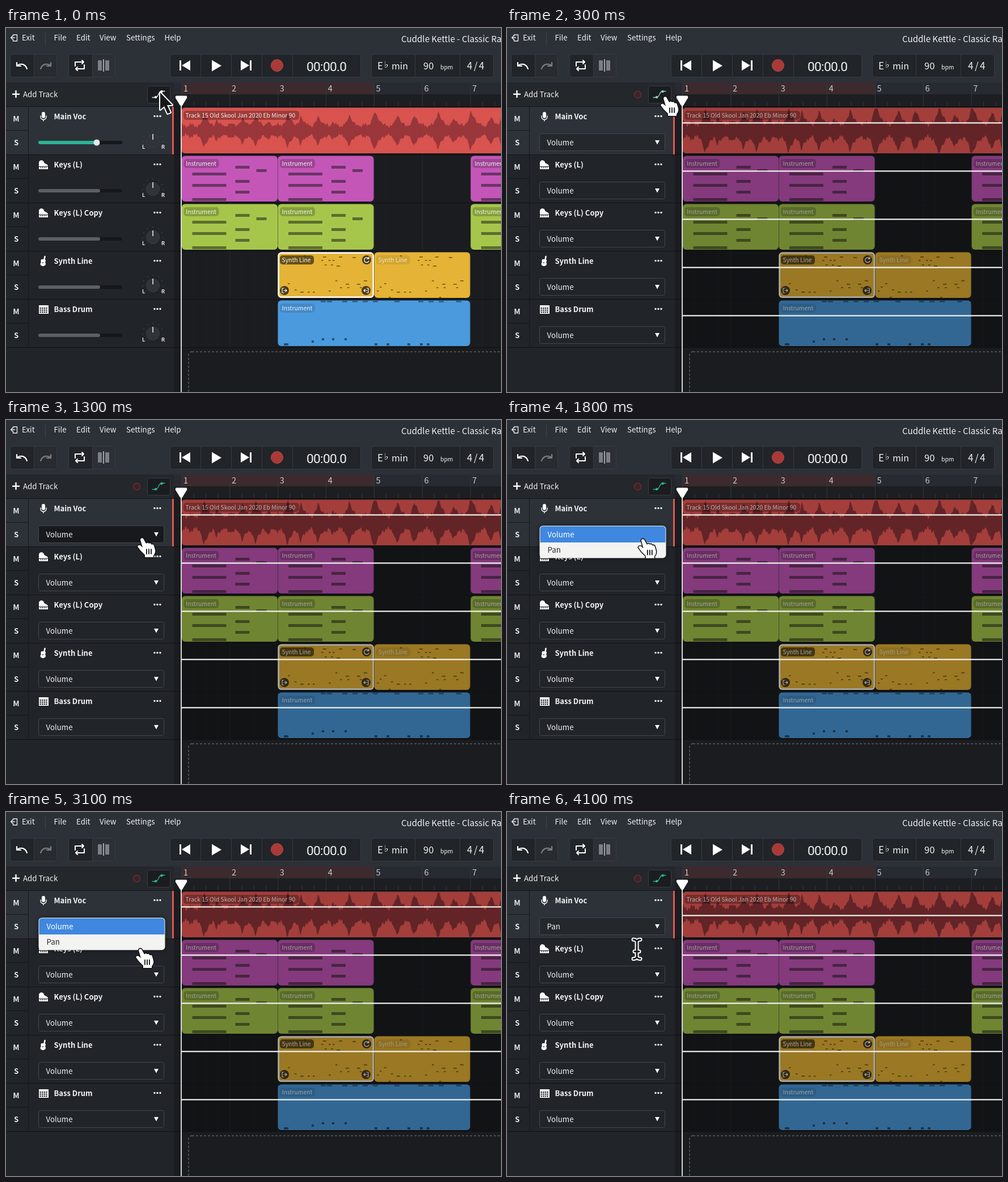
These frames come from a looping animation (873 px wide and 642 px high, 4700 ms). An HTML page with a canvas:

```html
<!DOCTYPE html>
<html lang="en">
<head>
<meta charset="utf-8">
<title>Track automation</title>
<style>
  html, body { margin: 0; width: 100%; height: 100%; overflow: hidden; background: #1a1c1f; }
  canvas { display: block; }
</style>
</head>
<body>
<canvas id="stage" width="873" height="642"></canvas>
<script>
const c = document.getElementById('stage').getContext('2d');
const SANS = '"Noto Sans CJK JP", "Noto Sans CJK SC", "Noto Sans", sans-serif';
const LOOP = 4700, STEP = 100, LAST = 4100;
const ROW = 85, TOP = 139;

// ---------- drawing helpers ----------
function rect(x, y, w, h, color) {
  c.fillStyle = color;
  c.fillRect(x, y, w, h);
}
function box(x, y, w, h, r, fill, stroke, lw = 1) {
  c.beginPath();
  c.roundRect(x, y, w, h, r);
  if (fill) { c.fillStyle = fill; c.fill(); }
  if (stroke) { c.strokeStyle = stroke; c.lineWidth = lw; c.stroke(); }
}
function dot(x, y, r, fill, stroke, lw = 1) {
  c.beginPath();
  c.arc(x, y, r, 0, 7);
  if (fill) { c.fillStyle = fill; c.fill(); }
  if (stroke) { c.strokeStyle = stroke; c.lineWidth = lw; c.stroke(); }
}
function shape(d, x, y, fill, stroke, lw = 1) {
  const p = new Path2D(d);
  c.save();
  c.translate(x, y);
  c.lineJoin = c.lineCap = 'round';
  if (stroke) { c.strokeStyle = stroke; c.lineWidth = lw; c.stroke(p); }
  if (fill) { c.fillStyle = fill; c.fill(p); }
  c.restore();
}
function text(s, x, y, size = 13.3, color = '#f1f2f3', weight = 400, family = SANS, spacing = 0) {
  c.font = `${weight} ${size}px ${family}`;
  c.letterSpacing = spacing + 'px';
  c.fillStyle = color;
  c.fillText(s, x, y);
}

// ---------- top bar ----------
function buttonGroup(x, w, splits) {
  box(x + .5, 46.5, w, 40, 4, '#212429', '#383c42');
  for (const s of splits) rect(s, 47, 1, 39, '#383c42');
}
function topBar() {
  rect(0, 0, 873, 96, '#2c3037');
  shape('M4 -3V-5H11V6H4V3M0 0H7M3 -3L0 0L3 3', 8.5, 17, null, '#e8e9ea', 1.4);
  rect(69, 8, 1, 23, '#3d4148');
  [['Exit', 28], ['File', 84.5], ['Edit', 124], ['View', 165], ['Settings', 212], ['Help', 279.5]]
    .forEach(([s, x]) => text(s, x, 22));
  text('Cuddle Kettle - Classic Rap', 697, 25, 15.1);

  buttonGroup(7, 82, [49]);
  buttonGroup(110, 82, [152]);
  buttonGroup(289, 336, [343, 397, 451, 505]);
  buttonGroup(644, 215, [721, 800]);
  rect(50, 47, 39, 39, '#282c31');
  rect(153, 47, 39, 39, '#2c3036');

  const undo = 'M-8 -1C-2 -5 6 -4 9 5M-9 -6V0H-2';
  shape(undo, 28, 67, null, '#fff', 2.2);
  c.save();
  c.scale(-1, 1);
  shape(undo, -70, 67, null, '#7c8085', 2.2);
  c.restore();
  shape('M-8 1V-6H7M4 -9L7 -6L4 -3M8 -1V6H-7M-4 3L-7 6L-4 9', 130, 66, null, '#fff', 2);
  rect(162, 57, 7, 18, '#7c8085');
  rect(175, 57, 7, 18, '#7c8085');
  rect(171, 55, 2, 22, '#a1a4a8');

  rect(306, 57, 3, 18, '#fff');
  shape('M0 0L15 -9V9Z', 310, 66, '#fff');
  shape('M0 -10L17 0L0 10Z', 363, 66.5, '#fff');
  shape('M0 -9L15 0L0 9Z', 414, 66, '#fff');
  rect(430, 57, 3, 18, '#fff');
  dot(478, 66, 10.5, '#a93a38', '#bd4743');

  text('00:00.0', 530, 76, 22.7, '#f1f2f3', 400, 'Roboto, sans-serif', -.7);
  text('E', 655, 73, 17);
  text('♭', 667, 70, 16, '#f1f2f3', 400, '"DejaVu Sans", sans-serif');
  text('min', 680, 73, 16);
  text('90', 736, 73, 16.5);
  text('bpm', 766, 73, 10.4);
  text('4/4', 813, 73, 17, '#f1f2f3', 400, SANS, 2.5);
}

// ---------- left panel ----------
const icons = [
  (x, y) => {
    box(x - 3, y - 8, 6, 11, 3, '#fff');
    shape('M-5 -1V1C-5 7 5 7 5 1V-1M0 6V8', x, y, null, '#fff', 1.4);
  },
  piano, piano,
  (x, y) => {
    shape('M2.5 -8L1 0', x, y, null, '#fff', 2.6);
    shape('M-1 -3C-5 -4 -5 0 -4 2C-7 5 -5 9 -1 9C4 9 5 5 3 2C5 -1 4 -3 1 -3Z', x, y, '#fff');
    dot(x - 1, y + 3, 1, '#333');
  },
  (x, y) => {
    rect(x - 8, y - 7, 17, 15, '#fff');
    for (let i = 0; i < 12; i++)
      rect(x - 6.5 + i % 4 * 3.6, y - 3 + (i >> 2) * 3.5, 2.4, 2.3, '#24272b');
  }
];
function piano(x, y) {
  shape('M-8 3V-3C-8 -9 0 -9 1 -4C2 -1 8 -2 8 3Z', x, y, '#fff');
  rect(x - 8, y + 4, 16, 4, '#fff');
  for (let i = -5; i < 7; i += 3) rect(x + i, y + 4, 1, 2.5, '#24272b');
}
function slider(y, active) {
  box(57, y - 3, 148, 6, 3, '#15171a');
  box(57, y - 3, active ? 103 : 109, 6, 3, active ? '#2bb596' : '#5d6063');
  if (active) dot(160, y, 5.5, '#e6e6e6');
}
function panKnob(y) {
  for (let i = 0; i <= 8; i++) {
    const a = (i - 4) * .55 - Math.PI / 2;
    rect(258.5 + 18 * Math.cos(a), y - .5 + 18 * Math.sin(a), 1.1, 1.1, '#65696e');
  }
  dot(259, y, 11.5, '#303439', '#3a3e43');
  rect(258.2, y - 12, 1.6, 10, '#e6e7e8');
  text('L', 240, y + 14, 9, '#e6e7e8', 600);
  text('R', 274, y + 14, 9, '#e6e7e8', 600);
}
function dropdown(y, label, fill) {
  box(57.5, y + 47.5, 221, 30, 3, fill, '#44484e');
  text(label, 70.5, y + 67.5);
  shape('M0 0H8L4 7.5Z', 261, y + 59, '#fff');
}
function leftPanel(state) {
  rect(0, 96, 296, 546, '#212429');
  rect(0, 96, 296, 42, '#24272c');
  rect(11, 115.5, 13, 2.4, '#fff');
  rect(16.3, 110, 2.4, 13, '#fff');
  text('Add Track', 30, 121.5);

  box(249.5, 102.5, 40, 30, 3, '#1a1c20', '#383c42');
  if (state.on) dot(230.5, 117.5, 6, '#3a2428', '#752c2f', 1.3);
  shape('M0 0H6C11 0 11 -11 16 -11H22', 258, 122.5, null, state.iconColor, 1.3);
  dot(264, 122, 2.2, state.iconColor);
  dot(274.5, 112, 2.2, state.iconColor);

  ['Main Voc', 'Keys (L)', 'Keys (L) Copy', 'Synth Line', 'Bass Drum'].forEach((name, i) => {
    const y = TOP + i * ROW, first = i === 0;
    if (first) rect(0, y, 296, 84, '#2d3238');
    rect(0, y - 1, 296, 1, '#121416');
    rect(0, y + 41, 40, 1, '#15171a');
    rect(39, y, 1, 84, '#15171a');
    text('M', 12.2, y + 25.5, 13.3, '#e6e7e8', 600);
    text('S', 14, y + 67.7, 13.3, '#e6e7e8', 600);
    icons[i](66, y + 17);
    text(name, 84.5, y + 21.5, 13, '#f4f5f5', 600);
    for (const x of [262, 267, 272]) dot(x, y + 16.5, 1.7, '#f1f2f3');
    if (state.on) {
      const fill = first ? (state.hover ? '#17191c' : '#24282d') : '#212429';
      dropdown(y, first && state.pan ? 'Pan' : 'Volume', fill);
    } else {
      slider(y + 63, first);
      panKnob(y + 60);
    }
  });
  rect(0, 563, 296, 1, '#121416');
  rect(293, TOP, 3, 84, '#e0574f');
}

// ---------- timeline ----------
function clip(x, y, w, color, draw) {
  c.save();
  box(x + .5, y - .5, w - 1, 80.5, 6, color);
  c.clip();
  draw(x, y);
  c.restore();
}
function label(s, x, y, w, shade = .2, alpha = .9) {
  box(x + 4, y + 5, w, 16, 5, `rgba(0,0,0,${shade})`);
  text(s, x + 7.5, y + 17, 10.4, `rgba(255,255,255,${alpha})`);
}

const peaks = [[350, 32], [372, 20], [398, 16], [417, 26], [440, 30], [462, 18], [497, 32], [520, 27],
  [550, 28], [577, 17], [605, 30], [650, 38], [690, 30], [720, 30], [762, 36], [790, 24], [820, 38], [855, 27], [876, 32]];
// Quick attack, slower decay around each peak, on a rippling floor.
function level(x) {
  const hit = Math.max(...peaks.map(([p, a]) => a * Math.exp(-Math.abs(x - p) / (x < p ? 8 : 13))));
  const floor = 10 + 3 * Math.sin(x * .37) + 2 * Math.sin(x * 1.3);
  return Math.max(floor, hit + 2 * Math.sin(x * .8));
}
function waveform(gain, color) {
  c.beginPath();
  c.moveTo(310, 181);
  for (let x = 310; x <= 874; x++) c.lineTo(x, 181 - Math.min(39, gain * level(x)));
  for (let x = 874; x >= 310; x--) c.lineTo(x, 181 + Math.min(39, gain * level(x + 1)));
  c.fillStyle = color;
  c.fill();
}

const chords = [[19, 29, 60], [19, 49, 60], [19, 74, 60], [95, 17, 25], [95, 42, 25], [95, 61, 25], [132, 23, 18]];
function keysClip(x, y, color) {
  clip(x, y, 170, color, () => {
    for (const [dx, dy, w] of chords) rect(x + dx, y + dy, w, 5, 'rgba(20,20,20,.5)');
    label('Instrument', x, y, 62);
  });
}

const synthNotes = [[77, 13], [83, 21], [90, 13], [97, 13], [94, 21], [108, 7], [80, 7], [104, 23], [132, 8], [46, 5],
  [10, 60], [18, 54], [30, 65], [40, 69], [53, 69], [62, 69], [90, 67], [102, 49], [110, 61], [120, 55], [123, 61],
  [140, 55], [145, 61], [152, 49], [5, 67], [26, 78], [115, 78]];
function synthClip(x, y, selected) {
  clip(x, y, 170, '#e5b335', () => {
    for (const [dx, dy] of synthNotes) rect(x + dx, y + dy, dx % 4 ? 3.5 : 6, 1.8, 'rgba(40,30,10,.55)');
    label('Synth Line', x, y, 60, selected ? .55 : .08, selected ? .95 : .7);
  });
  if (!selected) return;
  box(x + 1.7, y + .8, 167, 78, 5, null, '#fff', 2.5);
  for (const [dx, dy] of [[157, 13], [12, 67], [156, 67]]) dot(x + dx, y + dy, 8, '#4b3d1c');
  shape('M3 -3A4.3 4.3 0 1 0 4 2M4 -5V-2H1', x + 157, y + 13, null, '#fff', 1.3);
  shape('M-1 -4H-4V4H-1M-1 0H4M2 -2L4 0L2 2', x + 12, y + 67, null, '#fff', 1.2);
  shape('M1 -4H4V4H1M2 0H-4M-2 -2L-4 0L-2 2', x + 156, y + 67, null, '#fff', 1.2);
}
function drumClip(x, y) {
  clip(x, y, 340, '#4a9add', () => {
    const ink = 'rgba(15,30,45,.6)';
    for (const dx of [76, 87, 114, 132, 150, 168, 206, 248, 266, 284, 315]) rect(x + dx, y + .5, 9, 2, ink);
    for (const [dx, dy] of [[60, 70], [78, 66], [96, 66], [118, 66]]) rect(x + dx, y + dy, 4, 4, ink);
    for (const dx of [11, 171, 192, 229, 251, 263]) rect(x + dx, y + 75, dx < 20 ? 8 : 5, 4, ink);
    label('Instrument', x, y, 62, .1);
  });
}

function timeline(state) {
  rect(296, 96, 577, 546, '#1a1c1f');
  rect(296, 96, 577, 21, '#272b31');
  rect(310, 96, 339, 21, '#3c2a2e');
  rect(296, 117, 577, 22, '#1c1e22');
  for (let i = 0; i < 27; i++) {
    const x = 309.5 + i * 21.22, bar = i % 4 === 0;
    rect(x, bar ? 97 : 130, 1, bar ? 41 : 8, '#34383d');
    rect(x, TOP, 1, 424, bar ? '#26292d' : '#1f2225');
    if (bar) text(String(i / 4 + 1), x + 3.5, 112, 14.5, '#c9cbcd');
  }
  for (let i = 0; i <= 5; i++) rect(296, TOP - 1 + i * ROW, 577, 1, '#0f1012');

  clip(309, 141, 580, '#d9534f', () => {
    waveform(state.on ? 1.25 : .92, state.on ? '#843034' : '#96353a');
    if (!state.on) for (let x = 310; x < 873; x += 3) rect(x, 142, 1, 78, 'rgba(217,83,79,.16)');
    label('Track 15 Old Skool Jan 2020 Eb Minor 90', 309, 141, 204, .28);
  });
  [['#c456b8', 226], ['#a6c64b', 311]].forEach(([color, y]) => {
    for (const x of [309.5, 479, 819]) keysClip(x, y, color);
  });
  synthClip(479, 396, true);
  synthClip(649, 396, false);
  drumClip(479, 481);

  if (state.on) for (let i = 0; i < 5; i++) {
    const y = TOP + i * ROW;
    rect(310, y, 563, 84, `rgba(0,0,0,${i ? .33 : .25})`);
    rect(310, y + (i === 0 && state.pan ? 42.5 : 27.3), 563, 2.2, '#f4f4f0');
  }

  c.setLineDash([4, 3]);
  box(322, 571, 700, 200, 6, null, '#565a5f', 1.6);
  c.setLineDash([]);
  rect(308.2, 136, 1.7, 506, '#f4f4f4');
  shape('M-8 -9H8Q11 -9 10 -5L2 8Q0 10 -2 8L-10 -5Q-11 -9 -8 -9Z', 309, 128.5, '#fff');
}

// ---------- popup menu and pointer ----------
function menu() {
  c.save();
  c.shadowColor = 'rgba(0,0,0,.5)';
  c.shadowBlur = 8;
  box(57.5, 186.5, 223, 57, 6, '#f3f3f2');
  c.restore();
  box(58.5, 187.5, 221, 28.5, [5, 5, 0, 0], '#4087df');
  text('Volume', 71.5, 206.5, 13.3, '#fff');
  text('Pan', 71.5, 233.5, 13.3, '#26282a');
}

const ARROW = 'M1 2V32L8 26L14 39L19 37L13 24H22Z';
const HAND = 'M-3 3Q-2 -1 2 1L7 10Q10 7 12 10Q15 8 17 12Q20 10 21 14L23 21Q24 26 20 31V34H5V30L-3 22L-8 15Q-6 11 -2 14L1 17Z';
const IBEAM = 'M-6 -17Q-1 -17 0 -13Q1 -17 6 -17M-6 17Q-1 17 0 13Q1 17 6 17M0 -13V13M-4 4H4';
function pointer(t, x, y) {
  if (t < 200) {
    shape(ARROW, x, y, '#16181a', '#fff', 4);
  } else if (t < 3700) {
    shape(HAND, x, y, '#fff', '#101112', 3);
    shape('M8 20V28M12 20V28M16 20V28', x, y, null, '#101112', 1.8);
  } else {
    shape(IBEAM, x, y, null, '#fff', 7);
    shape(IBEAM, x, y, null, '#16181a', 3);
  }
}

const path = [[0, 271, 112], [200, 279, 121], [700, 279, 121], [1300, 240, 208], [1700, 240, 208],
  [2300, 237, 230], [3100, 237, 241], [3600, 236, 236], [4100, 229, 242]];
function pointerAt(t) {
  const i = Math.max(1, path.findIndex(p => p[0] >= t));
  const [t0, x0, y0] = path[i - 1], [t1, x1, y1] = path[i];
  const u = (t - t0) / (t1 - t0), e = u * u * (3 - 2 * u);
  return [x0 + (x1 - x0) * e, y0 + (y1 - y0) * e];
}

function render() {
  const t = Math.min(LAST, Math.floor(performance.now() % LOOP / STEP) * STEP);
  const [x, y] = pointerAt(t);
  const state = {
    on: t >= 300,
    pan: t >= 3600,
    hover: y > 186 && y < 217,
    iconColor: t < 300 ? '#f1f2f3' : t < 400 ? '#86d3bf' : '#2bb592'
  };
  timeline(state);
  leftPanel(state);
  topBar();
  if (t >= 1700 && t < 3600) menu();
  pointer(t, x, y);
  requestAnimationFrame(render);
}
render();
</script>
</body>
</html>
```
